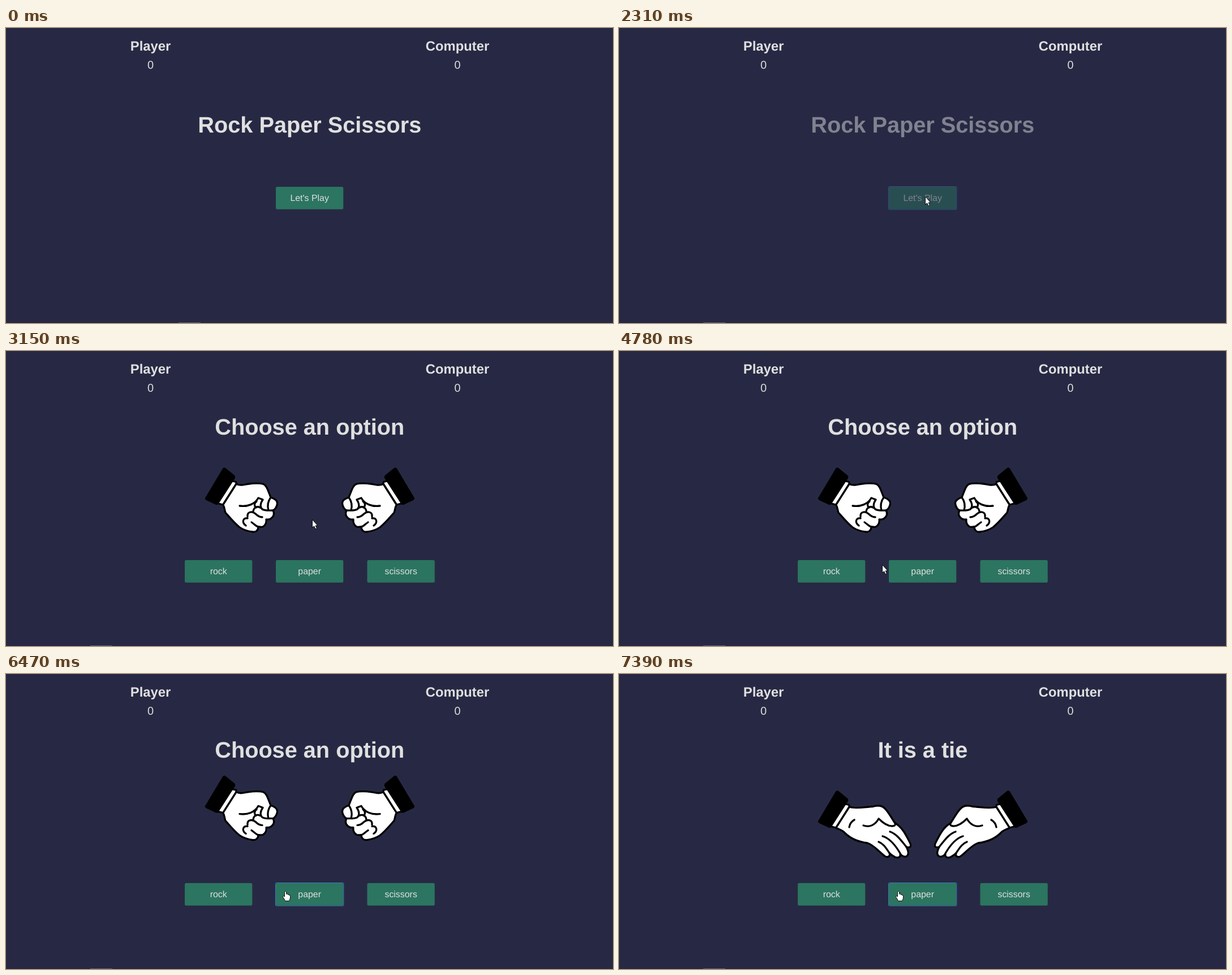
Write an HTML page that moves like this. It is 1073 by 522 pixels and loops after 8000 ms.

```html
<!DOCTYPE html>
<html lang="en">
<head>
<meta charset="utf-8">
<title>Rock Paper Scissors</title>
<style>
  html, body { margin: 0; width: 100%; height: 100%; overflow: hidden; background: #272944; }
  svg { display: block; }
  text { font-family: "Liberation Sans", Arial, sans-serif; fill: #e0e0e0; text-anchor: middle; text-rendering: geometricPrecision; }
  .title { font-size: 39.7px; font-weight: bold; }
  .name { font-size: 23.8px; font-weight: bold; }
  .score { font-size: 19.9px; }
  .button text { font-size: 15.9px; }
  .button rect { fill: #2c7560; }
  .button .focus { fill: none; stroke: #3f76bd; }
  .skin { fill: #fff; stroke: #000; stroke-width: 3.3; stroke-linejoin: round; }
  .crease { fill: none; stroke: #000; stroke-width: 3.3; stroke-linecap: round; stroke-linejoin: round; }
  #cursor path { fill: #fff; stroke: #000; stroke-width: .9; stroke-linejoin: round; }
</style>
</head>
<body>
<svg width="1073" height="522" viewBox="0 0 1073 522">
  <defs>
    <g id="cuff">
      <path class="skin" d="M399 230 406.500 231.500 407 235 383.500 272 372 269Z"/>
      <path d="M383 208Q385 205 388 207L404 220Q406 222 405 225L376 270Q374 273 371 272L354 264Q351 262 352 260Z"/>
    </g>
    <g id="fist">
      <path class="skin" d="M407 235C415 240 424 235 434 234.500C443 234 449 233.500 455 235.500C461 238 463 247 468 259C474 261 480 264 479.500 270C479 276 475 281 472 282C475 288 473 293 469 296C466 299 463 298 460 298C461 304 458 309 454 311C451 312 449 311 446 311C446 317 442 321 436 320C428 319 419 316 413 312C404 305 395 294 388 286C386 282 387 277 383.500 272Z"/>
      <path class="crease" d="M413 274C427 276 440 271 446 260L454 263C449 270 449 277 453 280C458 283 466 282 472 282M468 259C463 266 462 275 464 282M443 266C438 270 439 275 442 277M437 285C437 277 444 274 449 277M427 293C426 284 435 283 441 288C445 292 449 294 453 294M424 309C416 303 419 295 427 296M434 303C440 307 443 311 446 311"/>
      <use href="#cuff"/>
    </g>
    <g id="paper">
      <path class="skin" d="M407 235C418 239 436 235 449 234.500C457 232 464 232 470 238C477 245 483 257 488 264C501 271 508 286 515 300C517 306 514 308 508 306C512 314 513 319 509 322C505 325 501 322 497 319C498 324 494 326 488 324C484 322 481 320 478 317C480 322 476 325 471 323C461 316 450 302 439 299C422 297 409 291 399 281C395 276 390 276 383.500 272Z"/>
      <path class="crease" d="M407 271C408 265 411 261 416 258M432 268C443 272 453 267 459 256C465 262 474 270 484 269C489 269 489 265 487 262M479 279C491 283 499 295 508 306M466 287C480 291 490 305 498 319M459 297C469 301 473 310 479 318"/>
      <use href="#cuff"/>
    </g>
    <g id="pair">
      <use class="hand"/>
      <use class="hand" transform="matrix(-1 0 0 1 1074 0)"/>
    </g>
  </defs>

  <rect width="1073" height="522" fill="#272944"/>
  <rect y="521" width="1073" height="1" fill="#2a1f3d"/>
  <rect id="tab" y="521" width="39" height="1" fill="#665f7b"/>
  <text class="name" x="255.500" y="40">Player</text>
  <text class="score" x="255.500" y="71.500">0</text>
  <text class="name" x="798" y="40">Computer</text>
  <text class="score" x="798" y="71.500">0</text>

  <g id="intro"><text class="title" x="536.800" y="185">Rock Paper Scissors</text></g>
  <g id="match">
    <text class="title" id="result" x="536.800" y="148"></text>
    <use id="hands" href="#pair"/>
  </g>
  <g id="cursor">
    <path id="arrow" d="M.5.500V14.500L3.600 11.700 5.900 16.700 8.300 15.700 6.100 10.900H10Z"/>
    <path id="pointer" d="M-1.500 8V1.500Q0-.500 1.500 1.500V6Q3 0 4 6.500Q6 5 6.500 7.500Q8.500 6.500 8.500 9V12Q8 15 6.500 17.500H-.5Q-2 14-4.500 10.500Q-5 7.500-1.500 10Z"/>
  </g>
</svg>
<script>
const LOOP = 8000, FPS = 13;
const START = 2158, FADE = 500, SHAKE = 5369, SHAKE_TIME = 2000;
const BUTTON_W = 119.3, BUTTON_H = 39.7;
const $ = id => document.getElementById(id);

// Each entry: time, x, y
const cursorPath = [
  [430, 831, 523], [830, 811, 472], [1080, 811, 472], [1300, 547, 268], [1460, 547, 268],
  [1770, 541, 298], [3850, 541, 298], [4460, 428, 366], [4692, 455, 376], [4769, 465, 378], [5000, 494, 384]
];
// Each entry: share of the shake, height
const shakeKeys = [[0, 0], [.15, -40], [.25, 0], [.35, -40], [.5, 0], [.62, -40], [.75, 0], [.85, -40], [1, 0]];

function addButton(parent, label, x, y, focusId = "") {
  const focus = focusId && `<rect class="focus" id="${focusId}" x="${x - .5}" y="${y - .5}"
    width="${BUTTON_W + 1}" height="${BUTTON_H + 1}" rx="1"/>`;
  $(parent).insertAdjacentHTML("beforeend", `<g class="button">
    <rect x="${x}" y="${y}" width="${BUTTON_W}" height="${BUTTON_H}" rx="2.500"/>${focus}
    <text x="${x + BUTTON_W / 2}" y="${y + 25}">${label}</text></g>`);
}
addButton("intro", "Let's Play", 477, 281, "playFocus");
addButton("match", "rock", 316, 370);
addButton("match", "paper", 477, 370, "paperFocus");
addButton("match", "scissors", 638.5, 370);

const clamp = v => Math.max(0, Math.min(1, v));
const bezier = (s, a, b) => 3 * s * (1 - s) ** 2 * a + 3 * s * s * (1 - s) * b + s ** 3;

// CSS "ease"
function ease(u) {
  let low = 0, high = 1;
  for (let i = 0; i < 24; i++) {
    const mid = (low + high) / 2;
    if (bezier(mid, .25, .25) < u) low = mid; else high = mid;
  }
  return bezier(low, .1, 1);
}

function track(keys, at, curve = u => u) {
  const next = keys.findIndex(k => k[0] > at);
  if (next === 0) return keys[0].slice(1);
  if (next < 0) return keys.at(-1).slice(1);
  const a = keys[next - 1], b = keys[next];
  const u = curve((at - a[0]) / (b[0] - a[0]));
  return a.slice(1).map((v, i) => v + (b[i + 1] - v) * u);
}

const show = (id, on) => $(id).setAttribute("visibility", on ? "inherit" : "hidden");
const fade = (t, from) => ease(clamp((t - from) / FADE));
const handShapes = document.querySelectorAll(".hand");

function draw(t) {
  const started = t > 2130, done = t >= SHAKE + SHAKE_TIME;
  $("intro").setAttribute("opacity", 1 - fade(t, START));
  $("match").setAttribute("opacity", fade(t, START + FADE));
  show("playFocus", started);
  show("paperFocus", t >= SHAKE);

  $("tab").setAttribute("x", started ? 149 : 305);
  show("tab", started || t < 140);

  $("result").textContent = done ? "It is a tie" : "Choose an option";
  handShapes.forEach(hand => hand.setAttribute("href", done ? "#paper" : "#fist"));
  const [lift] = track(shakeKeys, (t - SHAKE) / SHAKE_TIME, ease);
  $("hands").setAttribute("transform", `translate(0 ${lift})`);

  const [x, y] = track(cursorPath, t);
  const over = x >= 477 && x <= 597 && y >= (t < START - 10 ? 281 : 370);
  $("cursor").setAttribute("transform", `translate(${Math.round(x)} ${Math.round(y)})`);
  show("cursor", t >= 430);
  show("arrow", !over);
  show("pointer", over);
}

function tick() {
  const t = performance.now() % LOOP;
  draw(Math.floor(t * FPS / 1000 + .3) * 1000 / FPS);
  requestAnimationFrame(tick);
}
tick();
</script>
</body>
</html>
```
